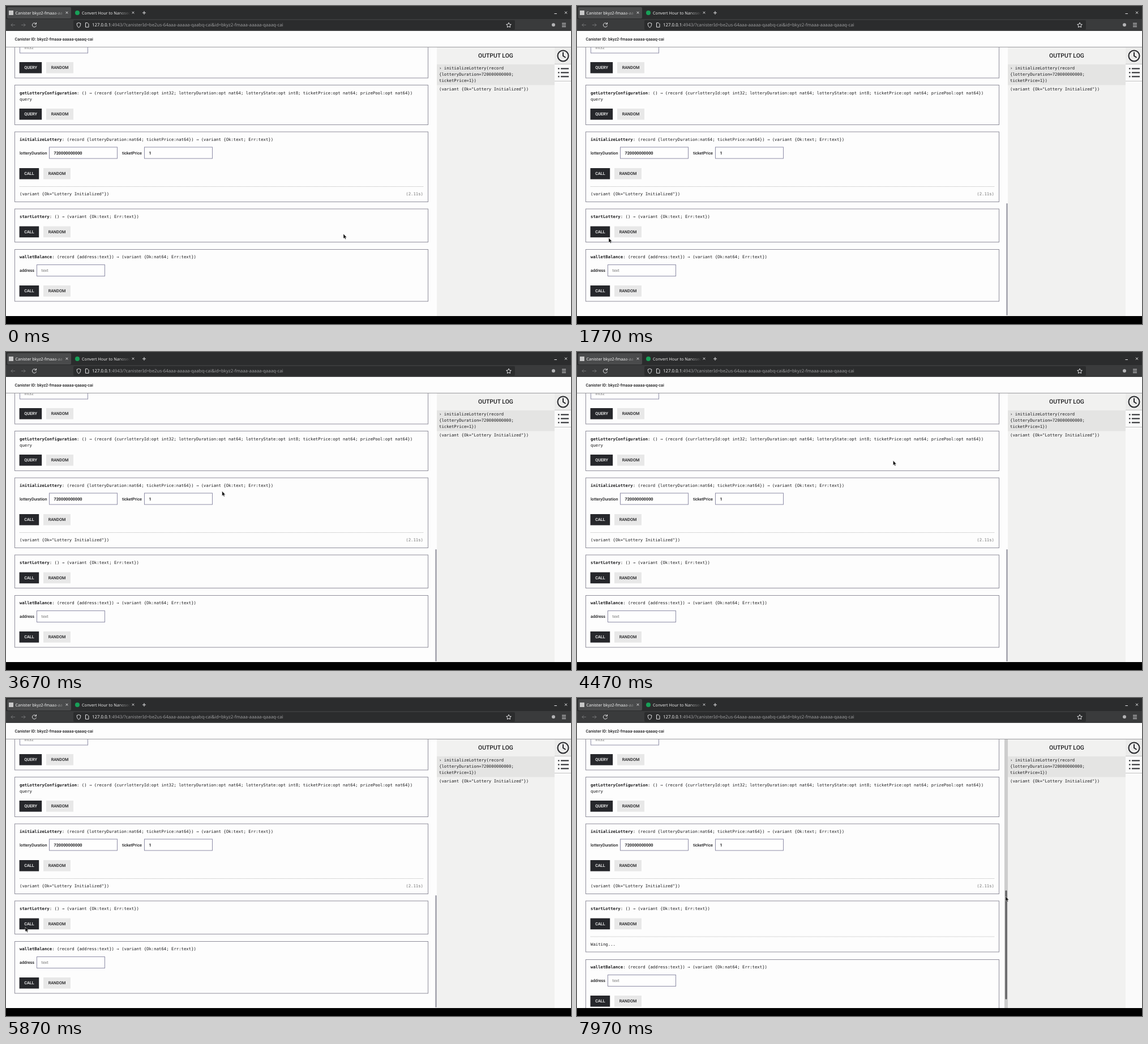
An HTML page for the animation above (8000 ms loop, 998x561 px).

```html
<!DOCTYPE html>
<html lang="en">
<head>
<meta charset="utf-8">
<title>Canister</title>
<style>
html, body { margin: 0; width: 100%; height: 100%; overflow: hidden; background: #000; }
svg { display: block; width: 998px; height: 561px; }
text { text-rendering: geometricPrecision; white-space: pre; }
.mono { font: 7.31px "DejaVu Sans Mono", monospace; fill: #1c1c1e; }
.ui { font: 500 7.28px Roboto, sans-serif; fill: #1c1c1e; }
.value { font-weight: 700; }
.hint { font-weight: 400; fill: #777; }
.tab { font: 7.2px "Noto Sans", sans-serif; }
.url { font: 7.85px "Noto Sans", sans-serif; fill: #9c9c9e; }
.box { fill: #fdfdfd; stroke: #8f8e9b; }
.input { fill: #fefefe; stroke: #8d8ca6; }
.icon { fill: none; stroke: #e4e4e6; }
.ink { fill: none; stroke: #25262a; stroke-width: 2; }
</style>
</head>
<body>
<svg id="stage" viewBox="0 0 998 561"></svg>
<script>
const LOOP = 8000, CLICK = 6100, SHIFT = 32;

const rect = (x, y, w, h, attrs) => `<rect x="${x}" y="${y}" width="${w}" height="${h}" ${attrs}/>`;
const text = (x, y, cls, s, attrs = '') => `<text x="${x}" y="${y}" class="${cls}" ${attrs}>${s}</text>`;
const path = (d, attrs = 'class="icon"') => `<path d="${d}" ${attrs}/>`;
const dot = (x, y, r, attrs) => `<circle cx="${x}" cy="${y}" r="${r}" ${attrs}/>`;
const mono = (x, y, s, attrs) => text(x, y, 'mono', s, attrs);
const card = (y, h, id = '') => rect(15.5, y, 730, h, `class="box" id="${id}"`);
const method = (y, name, sig) => mono(24, y, `<tspan font-weight="700">${name}</tspan>: ${sig}`);
const input = (x, y, s, cls = 'value') => rect(x, y, 120, 20, 'class="input"') + text(x + 8, y + 12.7, 'ui ' + cls, s);
const rule = y => path(`M24 ${y}H737`, 'stroke="#b4b4b4" stroke-dasharray="1 1"');
const cross = (x, y, r) => path(`M${x - r} ${y - r}l${2 * r} ${2 * r}m0 ${-2 * r}l${-2 * r} ${2 * r}`);

// A dark action button followed by the light RANDOM button
function buttons(y, label) {
  const w = label === 'CALL' ? 34 : 39, x = 24 + w + 8;
  const mid = 'text-anchor="middle"';
  return rect(23.6, y, w + 0.6, 19.6, 'fill="#26272b"') +
    text(24 + w / 2, y + 12.4, 'ui', label, mid + ' style="fill:#fff"') +
    rect(x, y, 48, 19.6, 'fill="#e8e8e8"') +
    text(x + 24, y + 12.4, 'ui', 'RANDOM', mid);
}

function fade(id, x1, x2, color) {
  return `<linearGradient id="${id}" gradientUnits="userSpaceOnUse" x1="${x1}" x2="${x2}" y1="0" y2="0">
    <stop stop-color="${color}"/><stop offset="1" stop-color="${color}" stop-opacity="0"/></linearGradient>`;
}

function browser() {
  return `<defs>${fade('fadeA', 82, 105, '#f4f4f4')}${fade('fadeB', 198, 220, '#e8e8e8')}</defs>` +
    rect(0, 0, 998, 23, 'fill="#2b2c2d"') +
    rect(2, 2, 113, 20, 'rx="2" fill="#4a4b4c"') +
    rect(0, 23, 998, 21, 'fill="#3a3b3c"') +
    rect(119, 25, 780, 17, 'rx="2" fill="#2b2c2d"') +
    rect(5, 8, 8, 8, 'fill="#c8c8c8"') + dot(126, 12, 4, 'fill="#18a058"') +
    text(16.5, 14.6, 'tab', 'Canister bkyz2-fmaaa-aa', 'fill="url(#fadeA)"') +
    text(134, 14.6, 'tab', 'Convert Hour to Nanosec', 'fill="url(#fadeB)"') +
    cross(107.5, 11.7, 1.8) + cross(224.5, 11.7, 1.8) + cross(989, 11.7, 2) +
    path('M241 12h6m-3-3v6M968.5 13.5h4.5') +
    path('M16 33.5H9m3-3l-3 3l3 3M27 33.5h7m-3-3l3 3l-3 3', 'class="icon" opacity=".32"') +
    path('M53 31.5a3.6 3.6 0 1 0 .5 3M53.5 29v3h-3') +
    path('M128.5 29.5l3.3 1.2c0 4-1 6-3.3 7.3c-2.3-1.3-3.3-3.3-3.3-7.3z') +
    path('M140.5 29.7h3.5l2 2v5.6h-5.5z') +
    text(152, 36.4, 'url', '<tspan fill="#f4f4f4">127.0.0.1</tspan>:4943/?canisterId=be2us-64aaa-aaaaa-qaabq-cai&amp;id=bkyz2-fmaaa-aaaaa-qaaaq-cai') +
    path('M888 29.3l1.3 2.8l3 .4l-2.2 2.1l.5 3l-2.6-1.4l-2.6 1.4l.5-3l-2.2-2.1l3-.4z') +
    dot(967, 33.3, 3, 'fill="#b4b4b6"') +
    path('M982 30.5h7m-7 3h7m-7 3h7');
}

function forms() {
  return card(60.5, 66.5) + input(24.5, 63, 'int32', 'hint') + buttons(99, 'QUERY') +
    card(139.5, 70) +
    method(155.7, 'getLotteryConfiguration', '() → (record {currlotteryId:opt int32; lotteryDuration:opt nat64; lotteryState:opt int8; ticketPrice:opt nat64; prizePool:opt nat64})') +
    mono(24, 166.7, 'query') + buttons(181, 'QUERY') +
    card(222, 123.5) +
    method(237.9, 'initializeLottery', '(record {lotteryDuration:nat64; ticketPrice:nat64}) → (variant {Ok:text; Err:text})') +
    text(24, 261.7, 'ui', 'lotteryDuration') + input(76.5, 249, '720000000000') +
    text(205, 261.7, 'ui', 'ticketPrice') + input(244.5, 249, '1') +
    buttons(286, 'CALL') + rule(318.5) +
    mono(24, 333.9, '(variant {Ok="Lottery Initialized"})') +
    mono(737, 333.9, '(2.11s)', 'text-anchor="end" style="fill:#777"') +
    card(358, 58.5, 'start') +
    method(374, 'startLottery', '() → (variant {Ok:text; Err:text})') + buttons(388.6, 'CALL') +
    `<g id="waiting">${rule(421) + mono(24, 436.9, 'Waiting...')}</g>` +
    `<g id="wallet">${card(429.5, 91.5) +
      method(445, 'walletBalance', '(record {address:text}) → (variant {Ok:nat64; Err:text})') +
      text(24, 469, 'ui', 'address') + input(54.5, 456.5, 'text', 'hint') +
      buttons(493, 'CALL')}</g>`;
}

function sidebar() {
  const log = ['› initializeLottery(record', '{lotteryDuration=720000000000;', 'ticketPrice=1})'];
  return rect(761, 73, 208, 474, 'fill="#f1f1f0"') +
    rect(969, 73, 29, 474, 'fill="#fafafa"') +
    rect(969, 73, 29, 29, 'fill="#ebebea"') +
    path('M969 102.5h29m-29 30h29', 'stroke="#c4c4c4"') +
    text(865, 91.2, 'ui', 'OUTPUT LOG', 'text-anchor="middle" style="font-size:10.4px"') +
    rect(761, 103, 208, 36.5, 'fill="#e4e4e3"') +
    log.map((s, i) => mono(765, 112.1 + i * 11, s)).join('') +
    mono(765, 149.1, '(variant {Ok="Lottery Initialized"})') +
    dot(984, 88, 9.5, 'class="ink"') + path('M984 81.5v6.500l4.500 3', 'class="ink"') +
    path('M975 110.5h2.5m2.5 0h14m-19 7h2.5m2.5 0h14m-19 7h2.5m2.5 0h14', 'class="ink"');
}

const $ = id => document.getElementById(id);
$('stage').innerHTML =
  rect(0, 0, 998, 547, 'fill="#fdfdfd"') + forms() +
  rect(0, 44, 998, 29, 'fill="#fdfdfd"') + path('M0 72.5H998', 'stroke="#9a9a9e"') +
  text(15.5, 61.2, 'ui', 'Canister ID: bkyz2-fmaaa-aaaaa-qaaaq-cai') +
  browser() + sidebar() +
  rect(755, 73, 6, 474, 'id="track" fill="#cdcdcd"') + '<rect id="thumb" rx="1"/>' +
  rect(0, 547, 998, 14, 'fill="#000"') +
  path('M0 0v8.3l1.9-1.6l1.3 2.9l1.4-.6l-1.3-2.8h2.5z', 'id="cursor" fill="#111" stroke="#fff" stroke-width=".4"');

// Pointer tip: time, x, y
const route = [
  [0, 596, 402], [330, 596, 402], [1130, 330, 420], [1770, 56, 409], [2000, 54, 407],
  [2200, 30, 398], [2400, 72, 404], [2600, 80, 380], [2750, 62, 360], [2800, 65, 366],
  [2930, 65, 366], [3230, 250, 297], [3370, 250, 297], [4170, 600, 160], [4470, 559, 191],
  [4730, 400, 305], [4900, 400, 305], [5430, 45, 400], [5600, 45, 400], [5870, 34, 404],
  [6670, 34, 404], [6900, 397, 332], [7200, 397, 332], [7800, 757, 345], [7970, 757, 350], [LOOP, 757, 350]
];

function pointer(t) {
  const i = route.findIndex(p => p[0] > t);
  const [t0, x0, y0] = route[i - 1], [t1, x1, y1] = route[i];
  const k = (t - t0) / (t1 - t0);
  return [x0 + (x1 - x0) * k, y0 + (y1 - y0) * k];
}

function set(id, attrs) {
  for (const name in attrs) $(id).setAttribute(name, attrs[name]);
}

function draw() {
  const t = performance.now() % LOOP;
  const waiting = t >= CLICK, hover = t >= 7780;
  set('cursor', { transform: `translate(${pointer(t)})` });
  set('start', { height: waiting ? 90 : 58.5 });
  set('waiting', { visibility: waiting ? 'visible' : 'hidden' });
  set('wallet', { transform: `translate(0 ${waiting ? SHIFT : 0})` });
  set('track', { visibility: hover ? 'visible' : 'hidden' });
  set('thumb', {
    visibility: t >= 360 ? 'visible' : 'hidden',
    x: hover ? 756.5 : 758.5, width: hover ? 3 : 2,
    y: waiting ? 339.5 : 348, height: waiting ? 192 : 198,
    fill: hover ? '#5c5c5e' : '#8b8b97'
  });
  requestAnimationFrame(draw);
}
draw();
</script>
</body>
</html>
```
